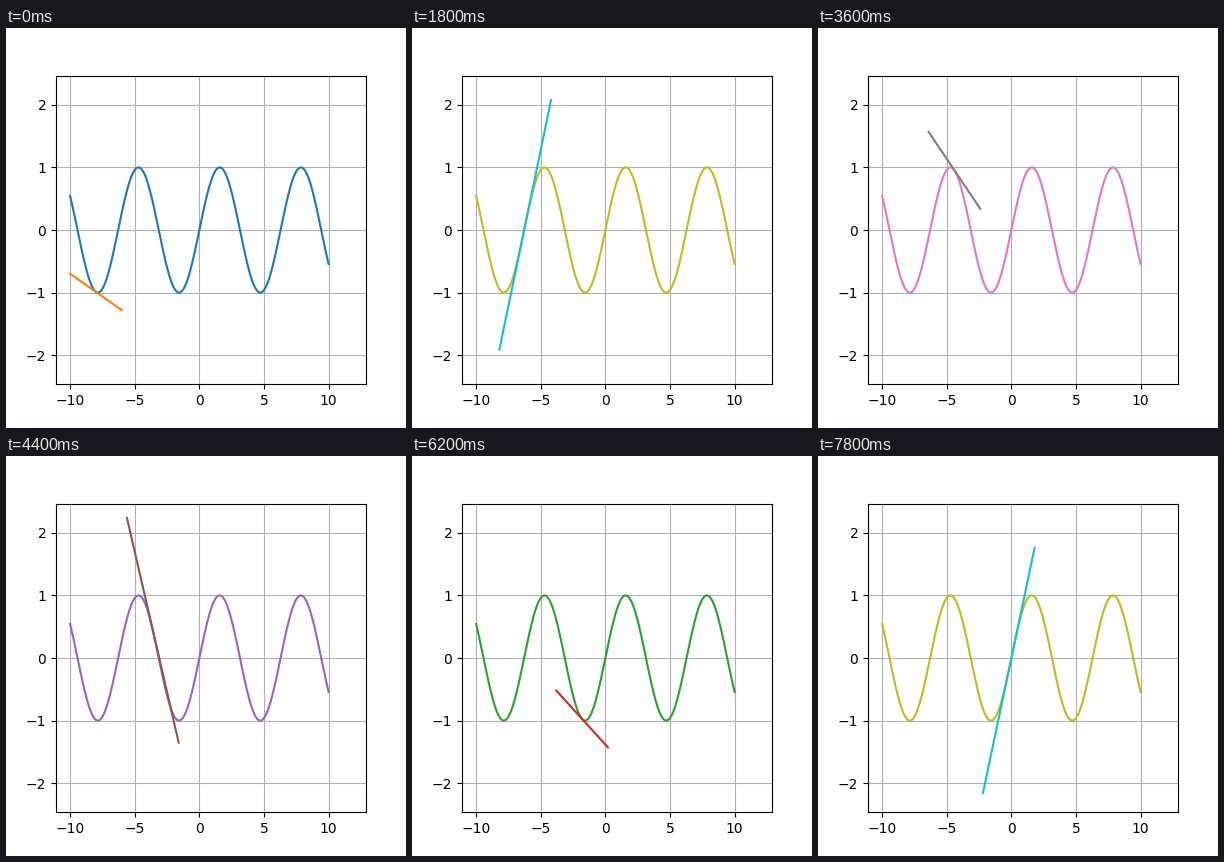
A matplotlib script for the animation above (8000 ms loop, 400 px wide and 400 px high).

```python
import numpy as np
import matplotlib.pyplot as plt
from matplotlib.animation import FuncAnimation

FRAMES = 40
INTERVAL = 200
STEP = 0.2
START = -8
HALF = 2  # half-width of the tangent segment
MARGIN = 0.05


def tangent(c):
    """Ends of the tangent to sin(x) at c."""
    dx = np.array([-HALF, HALF])
    return c + dx, np.sin(c) + np.cos(c) * dx


def padded(lo, hi):
    pad = MARGIN * (hi - lo)
    return lo - pad, hi + pad


fig, ax = plt.subplots(figsize=(4, 4), dpi=100)
ax.grid(True)

x = np.linspace(-10, 10, 200)
curve, = ax.plot(x, np.sin(x))
line, = ax.plot(*tangent(START))

# The view fits the whole sweep of the tangent, up to x = 9.8.
sweep = START + STEP * np.arange(90)
ends = np.array([tangent(c) for c in sweep])
ax.set_xlim(*padded(ends[:, 0].min(), ends[:, 0].max()))
ax.set_ylim(*padded(ends[:, 1].min(), ends[:, 1].max()))


def update(i):
    line.set_data(*tangent(START + STEP * i))
    curve.set_color(f"C{2 * i % 10}")
    line.set_color(f"C{(2 * i + 1) % 10}")
    return curve, line


anim = FuncAnimation(fig, update, frames=FRAMES, interval=INTERVAL,
                     init_func=lambda: update(0), repeat=True, repeat_delay=0)
plt.show()
```
